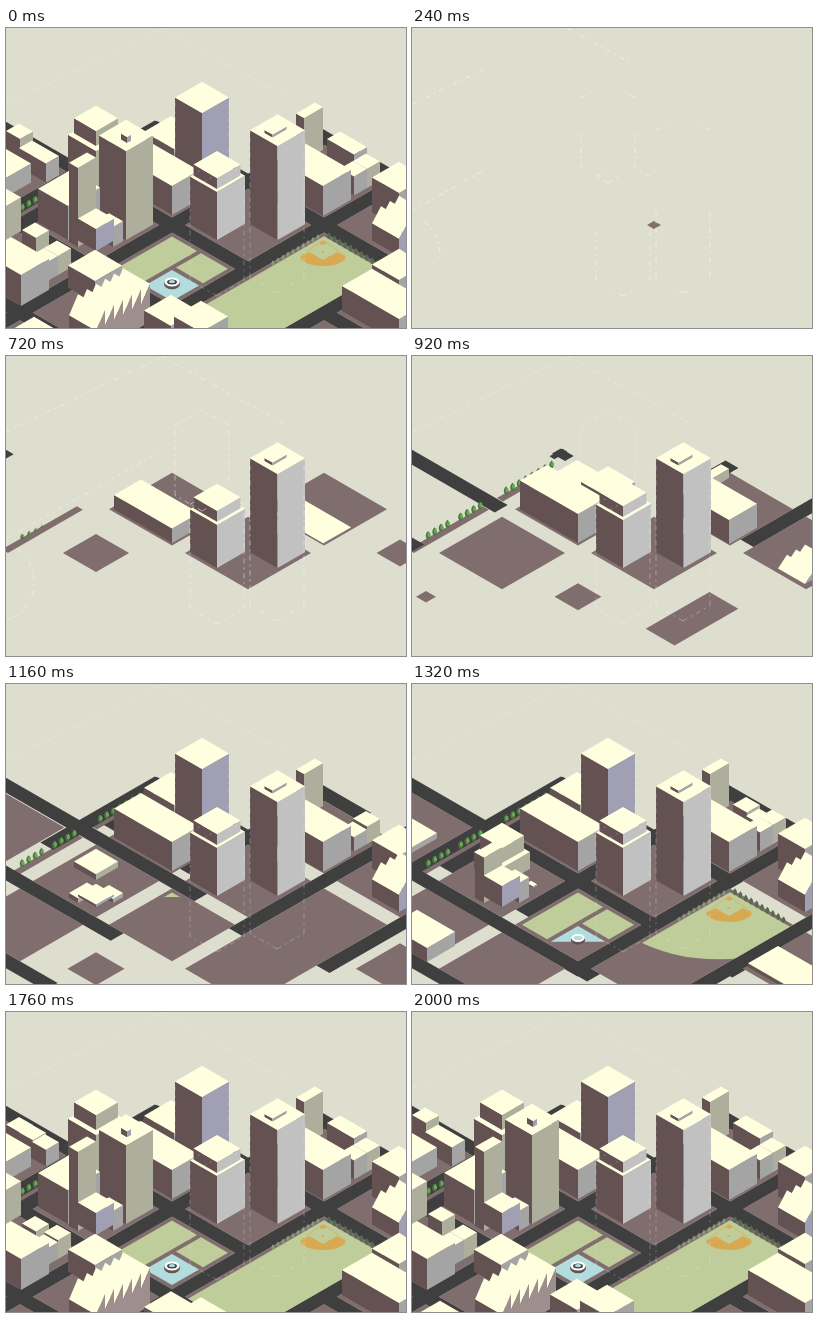
These frames come from a looping animation (400x300 px, 2760 ms). An HTML page with a canvas:

```html
<!DOCTYPE html>
<html lang="en">
<head>
<meta charset="utf-8">
<title>Isometric city</title>
<style>
html, body { margin: 0; width: 100%; height: 100%; overflow: hidden; background: #dedecf; }
canvas { display: block; width: 400px; height: 300px; }
</style>
</head>
<body>
<canvas id="c" width="400" height="300"></canvas>
<script>
const g = document.getElementById('c').getContext('2d');
const K = 0.577, LOOP = 2760, STEP = 40;
const PITCH = 76, HALF = 31.5, LANE = 6.5, SPEED = 0.44;
const SKY = '#dedecf', CREAM = '#ffffe0', DARK = '#645253', PLATE = '#806e6e', ROAD = '#3f3f40';
const GREY = '#a4a4a4', PALE = '#c1c1c1', BLUE = '#a09fb4', OLIVE = '#aeae9d', PINK = '#9f8e8e';
const GRASS = '#bfcd9b', CLAY = '#d9a952', WATER = '#b3dcdd';
let t = 0;

const lin = (t0, d) => Math.max(0, Math.min(1, (t - t0) / d));
const ease = (t0, d) => { const p = lin(t0, d); return p * p * (3 - 2 * p); };

function poly(color, ...p) {
  g.fillStyle = color;
  g.beginPath();
  for (let i = 0; i < p.length; i += 2) g.lineTo(p[i], p[i + 1]);
  g.closePath();
  g.fill();
}

// Flat tile around x, y; u runs right-down, v left-down.
function tile(color, x, y, u0, u1, v0, v1) {
  const pt = (u, v) => [x + u - v, y + (u + v) * K];
  poly(color, ...pt(u0, v0), ...pt(u1, v0), ...pt(u1, v1), ...pt(u0, v1));
}

const land = (color, ...uv) => tile(color, 242, 197, ...uv);

// City block i, j grows from its centre.
function plate(i, j, t0, v = HALF) {
  const s = ease(t0, 290), cu = i * PITCH, cv = j * PITCH;
  if (s) land(PLATE, cu - HALF * s, cu + HALF * s, cv - v * s, cv + v * s);
}

// Roads run between blocks, at half steps of the grid.
function roadU(line, from, to, t0) {
  const end = Math.min(to, from + (t - t0) * SPEED), v = line * PITCH;
  if (end > from) land(ROAD, from, end, v - LANE, v + LANE);
}

function roadV(line, from, to, t0, color = ROAD, half = LANE) {
  const end = Math.min(to, from + (t - t0) * SPEED), u = line * PITCH;
  if (end > from) land(color, u - half, u + half, from, end);
}

// x, y: front corner on the ground; a, b: widths of left and right faces.
function box(x, y, a, b, lo, hi, color) {
  const yb = y - lo, yt = y - hi;
  poly(DARK, x - a, yt - a * K, x, yt, x, yb, x - a, yb - a * K);
  poly(color, x, yt, x + b, yt - b * K, x + b, yb - b * K, x, yb);
  poly(CREAM, x, yt, x - a, yt - a * K, x - a + b, yt - (a + b) * K, x + b, yt - b * K);
}

// A building rises out of the ground, with an optional smaller box on its roof.
function rise(t0, d, x, y, h, color = GREY, a = 27, b = 27, cap) {
  const p = ease(t0, d);
  if (!p) return;
  const sink = (h + (cap ? cap.h : 0)) * (1 - p), top = h - sink;
  if (top > 0) box(x, y, a, b, 0, top, color);
  if (cap) box(x + cap.x, y + cap.y, cap.a, cap.b, Math.max(0, top), Math.max(0, top + cap.h), cap.color || color);
}

// Row of n small houses coming forward to the right (dir 1) or left (-1).
function houses(t0, x, y, n, dir = 1) {
  for (let i = 0; i < n; i++) {
    rise(t0 + i * 40, 280, x + 13 * i * dir, y + 7.5 * i, 19, i ? GREY : OLIVE, 14, 13);
  }
}

function saw(t0, x, y, b, h, tooth, n, color) {
  const up = ease(t0, 280) * (h + tooth), a = 27;
  if (!up) return;
  const wall = Math.max(0, up - tooth), peak = Math.min(tooth, up), w = b / n;
  for (let i = n - 1; i >= 0; i--) {
    const x0 = x + i * w, x1 = x0 + w, y0 = y - i * w * K, y1 = y0 - w * K;
    const lo = y0 - wall, hi = y1 - wall - peak;
    poly(CREAM, x0, lo, x1, hi, x1 - a, hi - a * K, x0 - a, lo - a * K);
    poly(color, x0, lo, x1, hi, x1, y1, x0, y0);
  }
  poly(DARK, x - a, y - wall - a * K, x, y - wall, x, y, x - a, y - a * K);
}

function tree(x, y, s, color) {
  if (s <= 0) return;
  g.fillStyle = color;
  g.beginPath();
  g.moveTo(x - 1, y);
  g.quadraticCurveTo(x - 4 * s, y - 4 * s, x, y - 8 * s);
  g.quadraticCurveTo(x + 4 * s, y - 4 * s, x + 1, y);
  g.fill();
}

function oval(x, y, r, color, k = K) {
  g.fillStyle = color;
  g.beginPath();
  g.ellipse(x, y, r, r * k, 0, 0, 7);
  g.fill();
}

function ground() {
  plate(0, 0, 180);
  plate(-1, 0, 363);
  plate(0, -1, 394);
  plate(-1, 1, 570);
  plate(1, -1, 600);
  plate(1, 0.5, 783, HALF + PITCH / 2);
  plate(0, 1, 800);
  plate(-1, 2, 847);
  plate(-2.22, 1, 900);
  plate(2, 0, 975);
  plate(0, 2, 1024);
  for (let i = -2; i < 3; i++) plate(i, 3 - Math.max(0, i), 1300);

  // Tree strip with a gap for the crossing
  roadV(-1.62, -22, 31, 780, PLATE, 3);
  roadV(-1.62, 45, 120, 500, PLATE, 3);
  roadV(-1.72, -44, 123, 900);
  roadV(-1.5, -38, 140, 1020);
  roadV(-0.5, -116, 216, 843);
  roadV(0.5, -132, 170, 745);
  roadV(1.5, -56, 86, 944);
  roadU(-1.5, -50, 64, 1040);
  roadU(-0.5, -136, 140, 909);
  roadU(0.5, -216, 44, 690);
  roadU(0.5, 114, 216, 1300);
  roadU(1.5, -140, 80, 880);
  roadU(2.5, -64, 10, 1030);
}

function park() {
  const edge = (t - 1135) * 0.28;
  if (edge <= 0) return;
  g.save();
  g.beginPath();
  g.rect(100, 200, 132, 6 + edge);
  g.clip();
  tile(GRASS, 166, 205, 3, 28, 3, 59);
  tile(GRASS, 166, 205, 32, 59, 3, 28);
  tile(WATER, 166, 205, 32, 59, 32, 59);
  g.restore();
  const s = ease(1240, 100);
  if (!s) return;
  oval(166, 256, 8 * s, DARK, 0.65);
  oval(166, 254, 7.5 * s, '#fff', 0.6);
  oval(166, 254, 5 * s, s < 1 ? WATER : '#3f4747', 0.5);
  oval(166, 253.5, 3 * s, WATER, 0.5);
}

function field() {
  const r = (t - 1170) * 0.79;
  if (r > 0) {
    g.save();
    g.beginPath();
    g.ellipse(307, 207, r, r * K, 0, 0, 7);
    g.clip();
    tile(GRASS, 318, 207, 1, 61, 1, 137);
    g.restore();
  }
  const s = ease(1200, 110);
  if (s) {
    g.save();
    g.translate(317, 210);
    g.scale(s, s);
    g.fillStyle = CLAY;
    g.beginPath();
    g.moveTo(0, 7);
    g.lineTo(23, 19);
    g.bezierCurveTo(19, 31, -19, 31, -23, 19);
    g.fill();
    tile(GRASS, 0, 0, 1, 19, 1, 19);
    g.strokeStyle = CLAY;
    g.lineWidth = 0.7;
    g.beginPath();
    g.moveTo(-22, 18);
    g.lineTo(0, 2);
    g.lineTo(22, 18);
    g.stroke();
    oval(0, 5, 3, CLAY);
    oval(0, 14, 1.5, CLAY);
    g.restore();
  }
  for (let i = 0; i < 10; i++) {
    const p = ease(1180 + i * 8, 80);
    tree(323 + i * 5.4, 211 + i * 3.1, p * 0.85, '#596a50');
    tree(312 - i * 5, 211 + i * 2.9, p * 0.6, '#8b9a76');
  }
}

function trees() {
  for (let i = 0; i < 20; i++) {
    if (i === 4 || (i > 8 && i < 12)) continue;
    const x = 16 + i * 6.5, y = 183 - i * 3.72, s = ease(660 + i * 9, 100);
    tree(x, y, s, '#4b7540');
    tree(x + 1, y - 2, s * 0.65, '#68aa54');
  }
}

function buildings() {
  // North
  rise(775, 310, 168, 150, 29, GREY, 30);
  rise(835, 300, 196, 155, 70, BLUE);
  rise(830, 300, 298, 133, 43, OLIVE, 8, 19);
  houses(1180, 335, 138, 2);
  houses(930, 361, 160, 2, -1);
  rise(692, 320, 317, 188, 30, GREY, 50, 28);
  rise(560, 320, 166, 187, 29, GREY, 58);
  rise(456, 320, 211, 212, 48, PALE, 27, 28, { x: 0, y: -3, a: 23.5, b: 23.5, h: 11 });
  rise(373, 320, 271.5, 212, 94, PALE, 27.5, 27.5, { x: -5, y: -8.5, a: 8, b: 14, h: 3, color: GREY });

  // East
  rise(930, 320, 393, 200, 35);
  saw(820, 393, 228, 27, 17, 12, 3, BLUE);
  rise(1420, 320, 393, 272, 20);
  rise(1240, 320, 393, 316, 25, GREY, 57, 30);

  // West
  houses(1620, 14, 130, 1);
  houses(1500, 27, 147, 2);
  rise(1220, 280, -2, 170, 19);
  rise(1060, 660, 90, 201, 78, OLIVE, 28, 28, { x: 0, y: -5, a: 22, b: 22, h: 15 });
  rise(1275, 610, 120, 212, 89, OLIVE, 27, 27, { x: 1, y: -8, a: 6, b: 4, h: 6, color: BLUE });
  rise(1380, 400, 62, 212, 34, GREY, 30, 32);
  rise(1100, 400, 72, 219, 79, OLIVE, 9, 18);
  rise(1090, 240, 107, 219, 20, GREY, 14, 10);
  rise(1110, 240, 90, 223, 22, BLUE, 18, 18);
  rise(1360, 340, 0, 212, 34, OLIVE, 20, 15);
  houses(1620, 30, 229, 1);
  houses(1500, 52, 247, 2, -1);
  rise(1170, 320, 15, 278, 31, GREY, 38, 28);

  // South
  rise(1440, 320, 89, 275, 22);
  saw(1330, 90, 325, 54, 22, 16, 6, PINK);
  for (const [x, y] of [[28, 345], [165, 323], [195, 329]]) rise(1610, 300, x, y, 25);
}

// Faint construction lines: long axes and tower outlines.
function sketch() {
  const p = lin(40, 420);
  const line = (x, y, dx, dy) => { g.moveTo(x, y); g.lineTo(x + dx * p, y + dy * p); };
  g.save();
  g.globalAlpha = 0.8 - 0.45 * lin(500, 500);
  g.strokeStyle = '#f8f8f4';
  g.lineWidth = 0.8;
  g.setLineDash([5, 4, 2, 4]);
  g.beginPath();
  line(0, 76, 158, -76);
  line(155, 0, 131, 72);
  if (t < 900) line(0, 183, 152, -86);
  for (const [x, y, h] of [[196, 155, 70], [271, 265, 147], [211, 268, 104]]) {
    for (const side of [-1, 1]) {
      line(x + 27 * side, y - 27 * K, 0, -h);
      line(x + 27 * side, y - h - 27 * K, -27 * side, -27 * K);
      line(x, y, 27 * side, -27 * K);
    }
  }
  g.stroke();
  if (t < 900) {
    g.beginPath();
    g.ellipse(-6, 226, 34, 38, 0, -1, -1 + 2.4 * p);
    g.stroke();
  }
  g.restore();
}

function draw(now) {
  t = Math.floor((now % LOOP) / STEP) * STEP;
  if (t < STEP) t = LOOP;
  g.fillStyle = SKY;
  g.fillRect(0, 0, 400, 300);
  ground();
  park();
  field();
  trees();
  buildings();
  sketch();
}

const start = performance.now();
function loop() {
  draw(performance.now() - start);
  requestAnimationFrame(loop);
}
loop();
</script>
</body>
</html>
```
